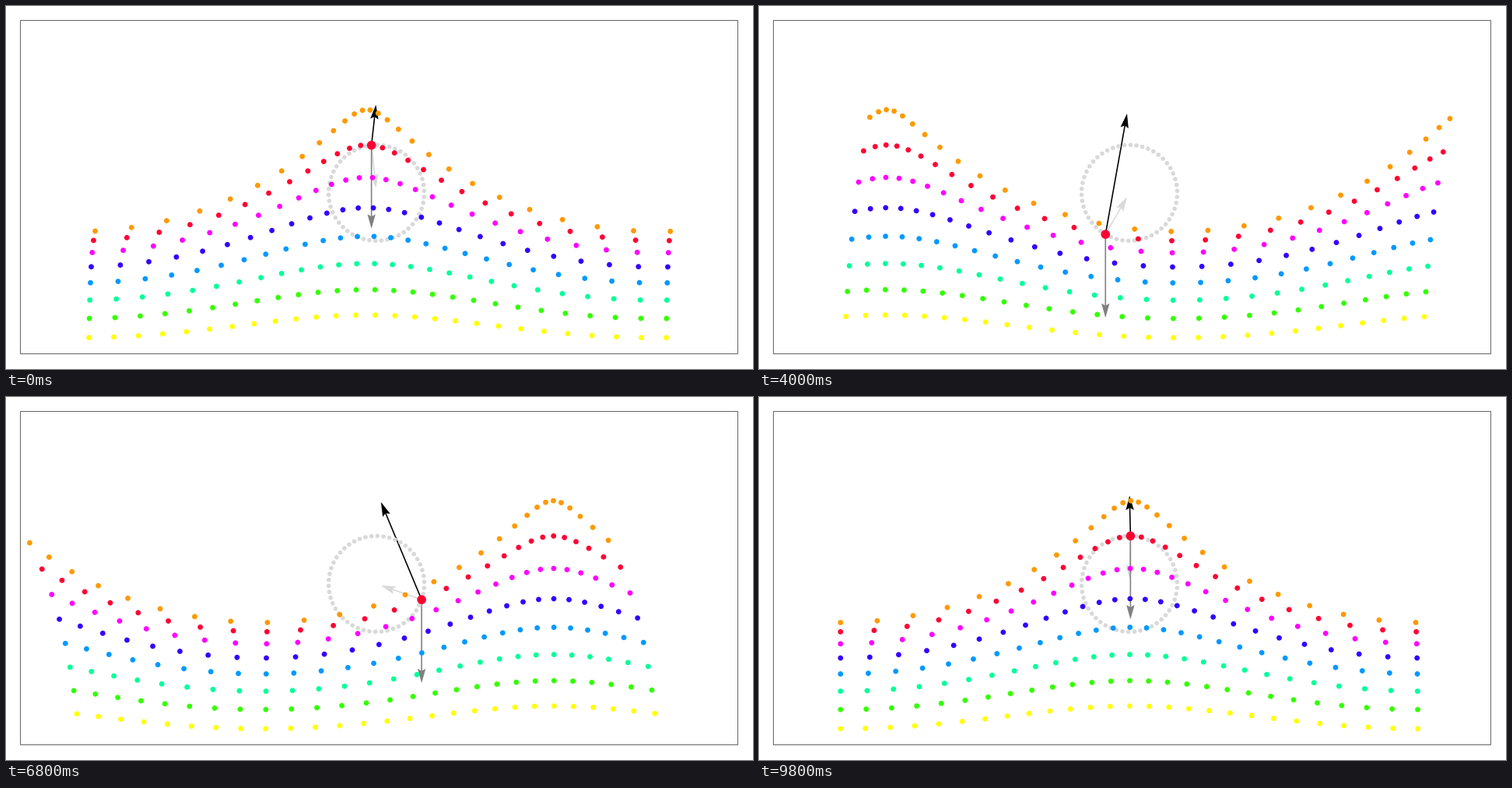
A matplotlib script for the animation above (10000 ms loop, 960 by 466 pixels).

```python
import colorsys

import numpy as np
import matplotlib.pyplot as plt
from matplotlib.animation import FuncAnimation
from matplotlib.patches import Circle, Polygon, Rectangle

W, H, DPI = 960, 466, 100
FRAMES, INTERVAL = 50, 200

UNIT = 119.0                 # pixels per radian of wave phase
STEP = 0.24                  # particle spacing in phase units
DEPTH = 0.66                 # depth of the marked particle
CX, CY = 476.05, 239.9       # its rest position
RADIUS = UNIT * np.exp(-DEPTH)
PHASE0 = 3.12 - 0.96 * np.pi
GRAVITY = 0.9 * UNIT
CENTRIPETAL = 0.9 * RADIUS
PT = 72 / DPI
LIGHT = "0.85"

fig = plt.figure(figsize=(W / DPI, H / DPI), dpi=DPI, facecolor="white")
ax = fig.add_axes([0, 0, 1, 1])
ax.set_xlim(0, W)
ax.set_ylim(H, 0)
ax.axis("off")

cols, rows = np.meshgrid(np.arange(-13, 14), np.arange(-1, 7))
cols, rows = cols.ravel(), rows.ravel()
rest_x = CX + cols * STEP * UNIT
rest_y = CY + rows * STEP * UNIT
orbit = RADIUS * np.exp(-STEP * rows)
hues = (0.1 - (rows + 1) * 2 / 15) % 1
colors = [colorsys.hsv_to_rgb(h, 1, 1) for h in hues]


def phase(frame):
    return PHASE0 + 2 * np.pi * frame / FRAMES


def dots(x, y, size, color, z):
    return ax.scatter(x, y, s=(size * PT) ** 2, c=color, linewidths=0, zorder=z)


class Arrow:
    """Thin shaft with a notched head."""

    HEAD = np.array([[0, 0], [-18.5, 5.2], [-15.5, 0], [-18.5, -5.2]])

    def __init__(self, color, z):
        self.shaft, = ax.plot([], [], color=color, lw=1.6 * PT, zorder=z,
                              solid_capstyle="butt", snap=False)
        self.head = Polygon(self.HEAD, fc=color, lw=0, zorder=z, snap=False)
        ax.add_patch(self.head)

    def place(self, start, vec):
        u = vec / np.hypot(*vec)
        normal = np.array([-u[1], u[0]])
        tip = start + vec
        self.head.set_xy(tip + np.outer(self.HEAD[:, 0], u)
                         + np.outer(self.HEAD[:, 1], normal))
        end = tip - 15 * u
        self.shaft.set_data([start[0], end[0]], [start[1], end[1]])


ax.add_patch(Rectangle((18.5, 18.5), 922, 428, fill=False, ec="0.4",
                       lw=PT, zorder=0, snap=False))

inward = Arrow(LIGHT, 1)
weight = Arrow("0.5", 2)
push = Arrow("black", 3)

ring = phase(np.arange(FRAMES))
dots(CX - RADIUS * np.sin(ring), CY - RADIUS * np.cos(ring), 5.6,
     [LIGHT] * FRAMES, 4)
water = dots(rest_x, rest_y, 6.8, colors, 5)
marked = Circle((CX, CY), 5.8, fc=colorsys.hsv_to_rgb(29 / 30, 1, 1), lw=0,
                zorder=6)
ax.add_patch(marked)


def update(frame):
    p = phase(frame)
    angle = p + cols * STEP
    water.set_offsets(np.column_stack([rest_x - orbit * np.sin(angle),
                                       rest_y - orbit * np.cos(angle)]))
    radial = np.array([np.sin(p), np.cos(p)])
    pos = np.array([CX, CY]) - RADIUS * radial
    marked.center = tuple(pos)

    accel = CENTRIPETAL * radial
    fall = np.array([0, GRAVITY])
    inward.place(pos, accel)
    weight.place(pos, fall)
    push.place(pos, accel - fall)
    return []


anim = FuncAnimation(fig, update, frames=FRAMES, interval=INTERVAL,
                     repeat=True, repeat_delay=0, blit=False,
                     init_func=lambda: update(0))
plt.show()
```
